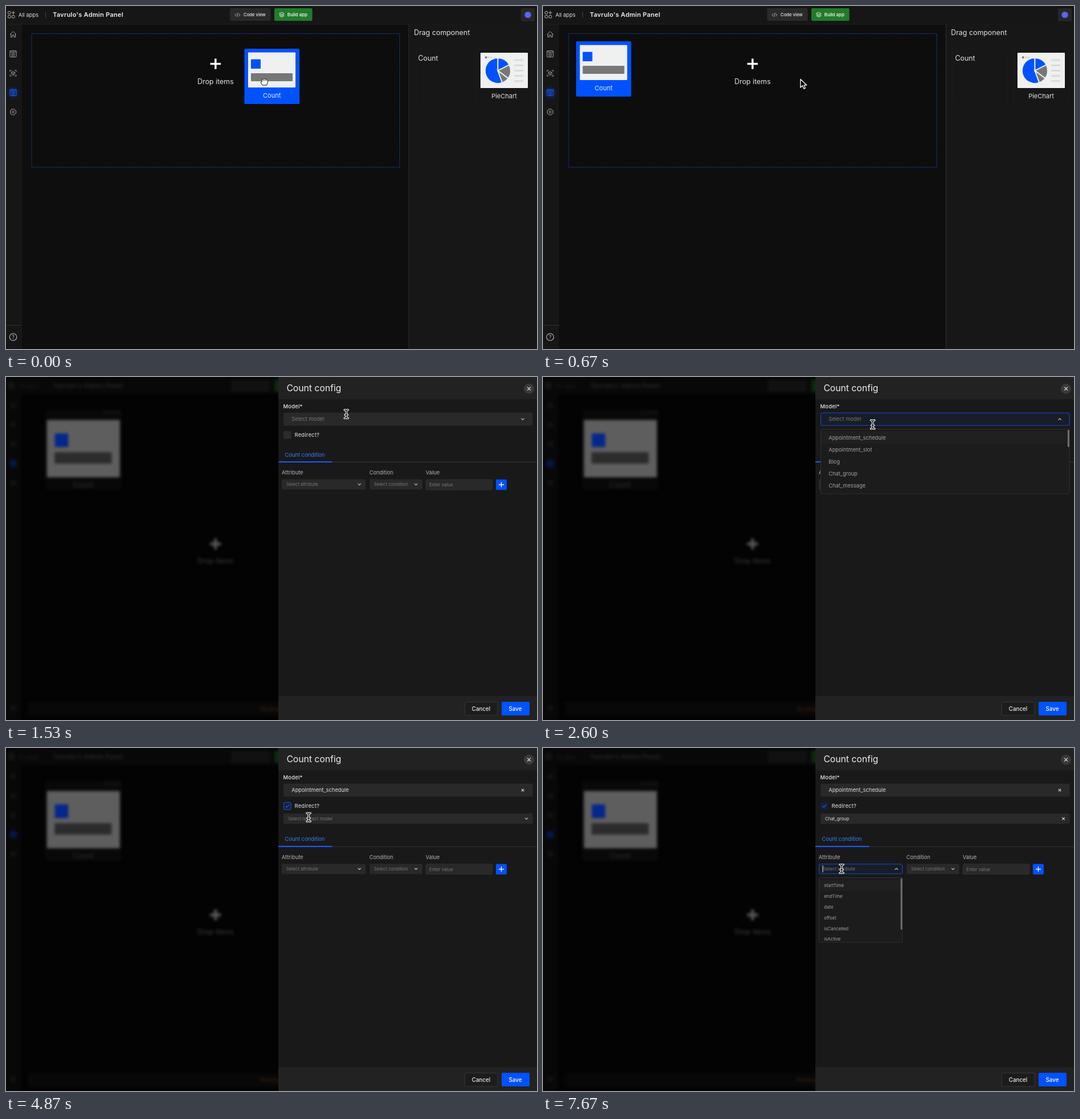
Recreate the animation shown at these times as an HTML page with a canvas. Size 930 by 602 pixels, loop 8 s.

```html
<!DOCTYPE html>
<html lang="en">
<head>
<meta charset="utf-8">
<title>Admin panel builder</title>
<style>
html, body { margin: 0; width: 100%; height: 100%; overflow: hidden; background: #0d0d0d; }
canvas { display: block; width: 930px; height: 602px; }
</style>
</head>
<body>
<canvas id="stage" width="930" height="602"></canvas>
<script>
const W = 930, H = 602, LOOP = 8000;
const BLUE = '#0052ff', PAPER = '#eff0f0', GRAY = '#777';
const stage = document.getElementById('stage').getContext('2d');
let g = stage;

const clamp = v => Math.max(0, Math.min(1, v));
const smooth = v => { v = clamp(v); return v * v * (3 - 2 * v); };
const mix = (a, b, k) => a + (b - a) * k;

// box by its edges
function box(x0, y0, x1, y1, fill, r = 0, stroke) {
  g.beginPath();
  g.roundRect(x0, y0, x1 - x0, y1 - y0, r);
  if (fill) { g.fillStyle = fill; g.fill(); }
  if (stroke) { g.strokeStyle = stroke; g.lineWidth = 1; g.stroke(); }
}

function disc(x, y, r, fill, stroke, width = 1) {
  g.beginPath();
  g.arc(x, y, r, 0, Math.PI * 2);
  if (fill) { g.fillStyle = fill; g.fill(); }
  if (stroke) { g.strokeStyle = stroke; g.lineWidth = width; g.stroke(); }
}

// path drawn around a local origin
function path(d, x, y, stroke, width = 1, fill) {
  const p = new Path2D(d);
  g.save();
  g.translate(x, y);
  g.lineCap = g.lineJoin = 'round';
  if (fill) { g.fillStyle = fill; g.fill(p); }
  if (stroke) { g.strokeStyle = stroke; g.lineWidth = width; g.stroke(p); }
  g.restore();
}

// y is the middle of the capitals
function text(s, x, y, size, color, { weight = 400, align = 'left', gap = 0 } = {}) {
  g.font = `${weight} ${size}px Inter, sans-serif`;
  g.letterSpacing = gap + 'px';
  g.textAlign = align;
  g.fillStyle = color;
  g.fillText(s, x, y + size * 0.36);
}

function plus(x, y, r, width, color) {
  g.fillStyle = color;
  g.fillRect(x - r, y - width / 2, r * 2, width);
  g.fillRect(x - width / 2, y - r, width, r * 2);
}

const cross = (x, y, r, color, w = 1) => path(`M${-r} ${-r}L${r} ${r}M${r} ${-r}L${-r} ${r}`, x, y, color, w);
const chevron = (x, y, up) => path(up ? 'M-2.3 1.1L0 -1.1L2.3 1.1' : 'M-2.3 -1.1L0 1.1L2.3 -1.1', x, y, '#c4c4c4', 1.2);

/* ---------- builder screen ---------- */

function sidebar() {
  const ink = '#a2a2a2';
  path('M-5 0L0 -4.8L5 0M-4 -.8V5H-1.5V1.5H1.5V5H4V-.8', 12.5, 49.5, ink);
  const windowIcon = (y, c) => {
    box(7, y - 5.5, 18, y + 5.5, null, 1, c);
    path('M-5.5 -3.2H5.5', 12.5, y, c);
    disc(12.5, y + 1.2, 2.7, null, c);
    disc(12.5, y + 1.2, .9, c);
  };
  windowIcon(84, ink);
  path('M-5.5 -3V-5H-3M3 -5H5.5V-3M5.5 3V5H3M-3 5H-5.5V3', 12.5, 118, ink);
  path('M0 -3.2L3 -1.6V1.8L0 3.4L-3 1.8V-1.6ZM-3 -1.6L0 0L3 -1.6M0 0V3.4', 12.5, 118, ink, .9);
  const glow = g.createRadialGradient(12.5, 152, 2, 12.5, 152, 13);
  glow.addColorStop(0, 'rgba(0,60,200,.4)');
  glow.addColorStop(1, 'rgba(0,60,200,0)');
  g.fillStyle = glow;
  g.fillRect(0, 138, 28, 28);
  windowIcon(152, '#1d62ff');
  path('M-2 -5H2L2.8 -3.4L5 -2.4V2.4L2.8 3.4L2 5H-2L-2.8 3.4L-5 2.4V-2.4L-2.8 -3.4Z', 12.5, 186, ink);
  disc(12.5, 186, 1.8, null, ink);
  box(0, 560, 28, 561, '#303030');
  disc(12.5, 581, 6.3, null, '#bdbdbd', 1.1);
  text('?', 12.5, 581.2, 9, '#bdbdbd', { align: 'center' });
}

function header() {
  const icon = '#b5b5b5';
  for (const [x, y] of [[3.5, 9.5], [3.5, 16.5], [10.5, 16.5]]) box(x, y, x + 4.5, y + 4.5, null, .8, icon);
  path('M0 -2.5V2.5M-2.5 0H2.5', 12.8, 11.8, icon);
  text('All apps', 21.7, 15.5, 9.4, '#dedede');
  box(69, 10, 70, 21, '#454545');
  text("Tavrulo's Admin Panel", 82, 15.5, 10.9, '#f2f2f2', { weight: 600, gap: .3 });
  box(392.5, 4, 463.5, 26, '#2a2a2a', 2);
  path('M-2.2 -2.3L-4.5 0L-2.2 2.3M2.2 -2.3L4.5 0L2.2 2.3M.8 -3L-.8 3', 405.5, 15.5, '#bbb', .9);
  text('Code view', 416, 15.2, 7.7, '#ececec', { weight: 500 });
  box(470, 4, 536.5, 26, '#227b2b', 2);
  path('M0 -4L4 -2L0 0L-4 -2ZM-4 0L0 2L4 0M-4 2L0 4L4 2', 483, 15.3, '#e8f5e8', .9);
  text('Build app', 492.7, 15.2, 7.9, '#fff', { weight: 500 });
  box(902, 4, 926, 27, '#262626', 2);
  disc(914, 15.5, 5.6, '#5865f2');
}

function slice(from, to, color) {
  g.beginPath();
  g.moveTo(861.5, 113.5);
  g.arc(861.5, 113.5, 22.5, from * Math.PI / 180, to * Math.PI / 180);
  g.closePath();
  g.fillStyle = color;
  g.fill();
  g.strokeStyle = PAPER;
  g.lineWidth = 1.8;
  g.stroke();
}

function palette() {
  box(705, 32, W, H, '#171717');
  box(705, 32, 706, H, '#2b2b2b');
  text('Drag component', 714.5, 47, 12.4, '#e2e2e2');
  box(718.5, 75.5, 812.5, 173, null, 2, '#1b1b1b');
  box(824.5, 75.5, 921, 173, null, 2, '#1d1d1d');
  text('Count', 721.7, 91.5, 12.4, '#e2e2e2');
  box(831, 82, 914, 144, PAPER, 1);
  box(839, 88.5, 842.5, 92, GRAY, 1);
  box(844, 88.5, 847, 92, '#d6d6d6', 1);
  box(848.5, 88.5, 851.5, 92, '#d6d6d6', 1);
  slice(70, 270, BLUE);
  slice(-90, -27, BLUE);
  slice(-27, 37, GRAY);
  slice(37, 70, GRAY);
  for (let i = 0; i < 5; i++) box(890, 93.5 + i * 9.2, 906, 96.5 + i * 9.2, '#dadada');
  text('PieChart', 872.5, 158, 11, '#e2e2e2', { align: 'center' });
}

function card(x, y) {
  box(x, y, x + 96.5, y + 97, BLUE, 2);
  box(x + 6.5, y + 6.5, x + 89.5, y + 68, PAPER, 1);
  box(x + 11.5, y + 18.5, x + 28.5, y + 35, BLUE, 1);
  box(x + 11.5, y + 43, x + 84.5, y + 57, GRAY, 1);
  text('Count', x + 48.2, y + 82, 11, '#e4edff', { align: 'center' });
}

function builder() {
  box(0, 0, W, H, '#0e0e0e');
  box(0, 0, W, 32, '#161616');
  box(0, 32, 28, H, '#161616');
  box(0, 31.5, W, 32.5, '#212121');
  palette();
  header();
  sidebar();
  g.setLineDash([2, 1]);
  box(45, 48.5, 689.5, 283, '#0d0d0d', 0, '#173fa5');
  g.setLineDash([]);
  plus(367, 101.5, 9.2, 3.4, '#fff');
  text('Drop items', 367, 132.5, 12.4, '#e4e4e4', { align: 'center' });
}

/* ---------- dimmed page behind the drawer ---------- */

function dimShapes() {
  box(0, 0, W, 30, '#080808');
  box(0, 30, 26, H, '#080808');
  box(3, 9, 15, 21, '#141414');
  text('All apps', 22, 15.5, 9.4, '#1e1e1e');
  text("Tavrulo's Admin Panel", 82, 15.5, 10.9, '#2a2a2a', { weight: 600, gap: .3 });
  box(394, 5, 462, 26, '#111', 2);
  box(470, 5, 536, 26, '#0c2c0f', 2);
  for (const y of [50, 84, 118, 186, 581]) disc(12.5, y, 5, '#131313');
  disc(12.5, 152, 7, '#06164a');
  box(68, 57, 203, 198, '#080808', 2);
  box(170, 60, 202, 66, '#101010');
  box(71.5, 75.5, 199.5, 176, '#5e5e5e', 1);
  box(85.5, 99, 109, 123, '#03278a', 1);
  box(85, 132, 185, 152, '#2c2c2c', 1);
  text('Count', 135, 189.5, 13, '#303030', { align: 'center' });
  plus(367, 293, 9.5, 5, '#585858');
  text('Drop items', 367, 323, 12.4, '#3d3d3d', { align: 'center' });
  box(38, 570, W, 595, '#080808');
  text('Pending', 445, 583, 9, '#4a2507');
}

function layer(draw) {
  const c = document.createElement('canvas');
  c.width = W;
  c.height = H;
  g = c.getContext('2d');
  draw();
  g = stage;
  return c;
}

const sharpDim = layer(dimShapes);
const dimmed = layer(() => {
  box(0, 0, W, H, '#030303');
  g.filter = 'blur(2.4px)';
  g.drawImage(sharpDim, 0, 0);
});

/* ---------- config drawer ---------- */

const OPEN = { model: 2000, redirect: 5000, attr: 7600 };
const PICK = { model: 3400, redirect: 6800 };
const CHECK = 4230;
const MODELS = ['Appointment_schedule', 'Appointment_slot', 'Blog', 'Chat_group', 'Chat_message', 'Comment'];
const FIELDS = ['startTime', 'endTime', 'date', 'offset', 'isCancelled', 'isActive'];

function select(t, f) {
  const { x0, y0, x1, y1, tx, size, hint, arrow, opened = 1e9, picked = 1e9, blurred = 1e9 } = f;
  const mid = (y0 + y1) / 2, focus = t >= opened && t < blurred, open = t >= opened && t < picked;
  box(x0, y0, x1, y1, focus ? '#181d27' : '#292929', 2);
  if (focus) box(x0 + .5, y0 + .5, x1 - .5, y1 - .5, null, 2, '#0f4ddb');
  if (t >= picked) {
    text(f.value, tx, mid, size, '#e0e0e0');
    cross(arrow, mid, 1.9, '#d5d5d5', 1.2);
  } else {
    text(hint, tx, mid, size, '#777');
    chevron(arrow, mid, open);
  }
  if (open && Math.floor((t - opened) / 510) % 2 === 0) box(tx - 1.2, mid - size * .78, tx - .2, mid + size * .78, '#f0f0f0');
}

function list(x0, y0, x1, items, tx, size, step, barEnd) {
  g.save();
  box(x0 + .5, y0 + .5, x1 - .5, y0 + 114, '#1c1c1c', 2, '#303030');
  g.clip();
  box(x0 + 1, y0 + 5, x1 - 4, y0 + 5 + step, '#202020');
  items.forEach((s, i) => text(s, tx, y0 + 4.7 + step * (i + .5), size, '#a2a2a2'));
  box(x1 - 3.7, y0 + 1.5, x1 - .7, y0 + barEnd, '#707070', 1.5);
  g.restore();
}

function checkbox(t) {
  const on = t >= CHECK;
  box(486, 95, 499.5, 108.5, on ? '#162035' : '#2b2b2b', 2);
  if (!on) return;
  if (t < OPEN.redirect) box(486.5, 95.5, 499, 108, null, 2, '#1556e0');
  path('M-3 .2L-1 2.3L3.4 -2.3', 492.7, 101.8, '#1a5cff', 1.1);
}

function conditions(t, dy) {
  const label = '#b4b4b4';
  text('Count condition', 488.6, 136.3 + dy, 9.3, '#3580f5');
  box(477, 149 + dy, W, 150 + dy, '#343434');
  box(477, 148 + dy, 571, 150 + dy, '#1a5cff');
  text('Attribute', 482.8, 167.7 + dy, 9.3, label);
  text('Condition', 636.5, 167.7 + dy, 9.2, label);
  text('Value', 735, 167.7 + dy, 9.3, label);
  const row = { y0: 179.5 + dy, y1: 197.5 + dy, size: 7.8 };
  select(t, { ...row, x0: 483, x1: 630, tx: 490.7, hint: 'Select attribute', arrow: 619, opened: OPEN.attr });
  select(t, { ...row, x0: 637, x1: 729, tx: 644.6, hint: 'Select condition', arrow: 718 });
  box(735.5, 180 + dy, 852, 198 + dy, '#292929', 2, '#2f2f2f');
  text('Enter value', 741.5, 189 + dy, 7.8, '#777');
  box(858, 179.8 + dy, 877, 198.3 + dy, BLUE, 2);
  plus(867.5, 189 + dy, 4.5, 1.4, '#fff');
}

function drawer(t) {
  const checked = t >= CHECK, dy = checked ? 23.7 : 0;
  box(477, 0, W, H, '#191919');
  box(477, 0, W, 39, '#222');
  text('Count config', 491.4, 19, 15.7, '#f0f0f0');
  disc(916, 20.5, 9, '#3a3a3a');
  cross(916, 20.5, 2.6, '#e6e6e6', 1.1);
  text('Model*', 485.6, 51.2, 9.3, '#ececec', { weight: 500, gap: .25 });
  select(t, {
    x0: 486, y0: 62.5, x1: 922.5, y1: 85.5, tx: 500.3, size: 9.25, hint: 'Select model', arrow: 905,
    value: MODELS[0], opened: OPEN.model, picked: PICK.model, blurred: CHECK
  });
  checkbox(t);
  text('Redirect?', 505.6, 101.5, 9.3, '#ececec', { gap: .25 });
  conditions(t, dy);
  if (checked) select(t, {
    x0: 486, y0: 115, x1: 922.5, y1: 133, tx: 494, size: 7.75, hint: 'Select redirect model', arrow: 911.5,
    value: MODELS[3], opened: OPEN.redirect, picked: PICK.redirect, blurred: OPEN.attr
  });
  if (t >= OPEN.model && t < PICK.model) list(486, 91, 922.5, MODELS, 500.3, 9.25, 21, 32);
  if (t >= OPEN.redirect && t < PICK.redirect) list(486, 138, 922.5, MODELS, 495.7, 7.75, 18.9, 32);
  if (t >= OPEN.attr) list(483, 227, 630, FIELDS, 492.3, 7.8, 18.9, 92);
  box(477, 560, W, H, '#222');
  box(803.5, 570.5, 861, 594, '#1c1c1c', 2, '#363636');
  text('Cancel', 832, 582, 9.8, '#ececec', { weight: 500, align: 'center' });
  box(868, 570, 917, 594, BLUE, 2);
  text('Save', 892, 582, 9.8, '#fff', { weight: 500, align: 'center' });
}

/* ---------- pointer ---------- */

// time, x, y of each rest or turn
const MOVES = [
  [0, 451, 128], [1000, 451, 128], [1500, 596, 65], [1640, 596, 65], [1900, 594, 72], [2380, 594, 72],
  [2960, 543, 107], [3400, 543, 107], [3440, 543, 109], [3830, 543, 109], [4180, 492, 96], [4680, 492, 96],
  [4870, 530, 121.5], [5930, 530, 121.5], [6350, 525, 209], [7390, 525, 209], [7590, 523, 212], [8000, 523, 212]
];
// start time and shape
const SHAPES = [
  [0, 'grab'], [330, 'arrow'], [1440, 'beam'], [2700, 'hand'], [3400, 'arrow'], [4100, 'hand'],
  [4790, 'beam'], [6060, 'hand'], [6800, 'beam']
];
const ARROW = 'M0 .5V15L3.5 11.8L5.9 17.3L8.4 16.2L6.1 10.8H10.8Z';
const HAND = 'M-1.6 .8C-1.6 -1 1.1 -1 1.1 .8V5L7.5 6.4Q9.4 7 9 9.3L7.6 14.4H.6L-3.6 8.7C-4.6 7 -3 6.2 -1.6 7.7Z';
const FIST = 'M-4.6 -2.6Q-4 -5.6 -2 -4.6Q0 -6.4 1.7 -4.6Q3.8 -5.4 4.4 -3.4Q6.6 -3 5.8 1L4 6H-3.2L-5.8 2Q-7 -.6 -4.6 -.6Z';
const BEAM = 'M-3 -7.3Q0 -7.3 0 -4.5V4.5Q0 7.3 -3 7.3M3 -7.3Q0 -7.3 0 -4.5V4.5Q0 7.3 3 7.3M-2 1.6H2';

function pointer(t) {
  const i = Math.max(1, MOVES.findIndex(m => m[0] > t));
  const [ta, xa, ya] = MOVES[i - 1], [tb, xb, yb] = MOVES[i];
  const k = smooth((t - ta) / (tb - ta)), x = mix(xa, xb, k), y = mix(ya, yb, k);
  const shape = SHAPES.filter(s => s[0] <= t).pop()[1];
  if (shape === 'arrow') path(ARROW, x, y, '#fff', 1.3, '#000');
  if (shape === 'hand') path(HAND, x, y, '#111', 1, '#fff');
  if (shape === 'beam') {
    path(BEAM, x, y, '#fff', 3.6);
    path(BEAM, x, y, '#000', 1.3);
  }
  if (shape === 'grab') {
    path(FIST, x + 1.5, y + 5, '#111', 1, '#fff');
    path('M-2 -3.5V-1.5M.4 -4V-1.5M2.8 -3.5V-1.5', x + 1.5, y + 5, '#222', .8);
  }
}

function render(t) {
  const shown = smooth((t - 690) / 105);
  if (shown < 1) {
    builder();
    const drop = 1 - Math.pow(1 - clamp((t - 300) / 350), 3);
    card(mix(417.5, 58, drop), mix(75, 62, drop));
  }
  if (shown > 0) {
    g.globalAlpha = shown;
    g.drawImage(dimmed, 0, 0);
    g.globalAlpha = 1;
    g.save();
    g.translate((1 - shown) * 453, 0);
    drawer(t);
    g.restore();
  }
  pointer(t);
}

const start = performance.now();
function tick() {
  render((performance.now() - start) % LOOP);
  requestAnimationFrame(tick);
}
tick();
</script>
</body>
</html>
```
